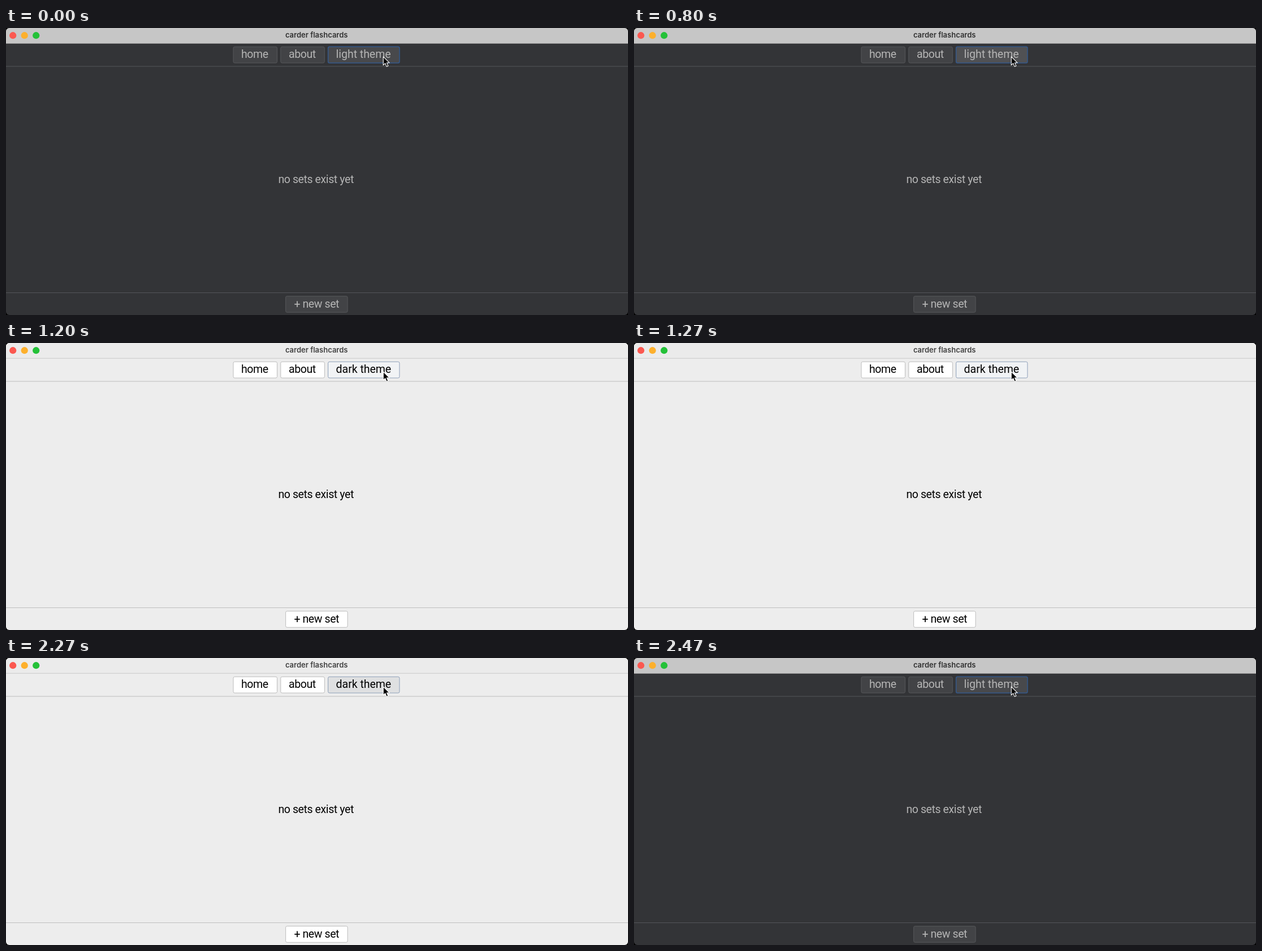
Write an HTML page that moves like this. It is 1100 px wide and 509 px high and loops after 2540 ms.

```html
<!DOCTYPE html>
<html lang="en">
<head>
<meta charset="utf-8">
<title>carder flashcards</title>
<style>
  html, body { margin: 0; width: 100%; height: 100%; overflow: hidden; background: #000; }
  svg { display: block; }
  .dark {
    --bar: #c6c6c6; --barline: #b9b9b9; --title: #303030; --bg: #333437; --line: #55565a;
    --text: #b5b5b5; --button: #424346; --border: #56575a;
    --focus: #34598c; --hover: #48494c; --press: #505154; --ring: 1.5;
  }
  .light {
    --bar: #ebebeb; --barline: #cacaca; --title: #404040; --bg: #ededed; --line: #bebebe;
    --text: #000; --button: #fff; --border: #bcbcbc;
    --focus: #8d9fb8; --hover: #f1f3f5; --press: #dfe0e1; --ring: 1;
  }
  .bar { fill: var(--bar); }
  .bg { fill: var(--bg); }
  .line { fill: var(--line); }
  .barline { fill: var(--barline); }
  .button { fill: var(--button); stroke: var(--border); }
  .toggle { fill: var(--hover); stroke: var(--focus); stroke-width: var(--ring); }
  .pressed .toggle { fill: var(--press); }
  .title { font: 600 13px Inter, sans-serif; fill: var(--title); text-anchor: middle; }
  .label { font: 19.5px Roboto, sans-serif; letter-spacing: -.4px; fill: var(--text); }
  .wide { letter-spacing: -.03px; }
</style>
</head>
<body>
<svg id="app" class="dark" width="1100" height="509" viewBox="0 0 1100 509">
  <clipPath id="frame"><rect width="1100" height="509" rx="6"/></clipPath>
  <g clip-path="url(#frame)">
    <rect class="bg" width="1100" height="509"/>
    <rect class="bar" width="1100" height="27"/>
    <rect class="barline" y="26.7" width="1100" height="1"/>
    <rect class="line" y="67.5" width="1100" height="1"/>
    <rect class="line" y="469" width="1100" height="1"/>
  </g>
  <circle cx="12.2" cy="13.2" r="6.1" fill="#fb5850"/>
  <circle cx="32.7" cy="13.2" r="6.1" fill="#fdb02d"/>
  <circle cx="53.2" cy="13.2" r="6.1" fill="#24c138"/>
  <text class="title" x="549.2" y="17.4">carder flashcards</text>

  <rect class="button" x="402" y="33.3" width="77.5" height="28.7" rx="2.5"/>
  <rect class="button" x="485.8" y="33.3" width="77.5" height="28.7" rx="2.5"/>
  <rect class="toggle" x="569.6" y="33.3" width="126.3" height="28.7" rx="2.5"/>
  <rect class="button" x="494.6" y="475.6" width="109.5" height="28.7" rx="2.5"/>

  <text class="label" x="416" y="53.3">home</text>
  <text class="label" x="500" y="53.3">about</text>
  <text class="label wide" id="theme" x="583.6" y="53.3">light theme</text>
  <text class="label" x="481.4" y="275.2">no sets exist yet</text>
  <text class="label" x="509.4" y="496">+ new set</text>

  <path d="M667.2 50.8V65.9L670.6 62.7L673.1 68.4L675.8 67.2L673.4 61.7H678Z"
        fill="#000" stroke="#fff" stroke-width="1.1" stroke-linejoin="round"/>
</svg>
<script>
  const LOOP = 2540;
  // start time, theme, toggle held down
  const steps = [
    [0, 'dark', false],
    [800, 'dark', true],
    [1070, 'light', false],
    [2200, 'light', true],
    [2400, 'dark', false]
  ];
  const app = document.getElementById('app');
  const label = document.getElementById('theme');
  const start = performance.now();
  let current;

  function show(step) {
    if (step === current) return;
    current = step;
    const [, theme, pressed] = step;
    app.setAttribute('class', theme + (pressed ? ' pressed' : ''));
    label.textContent = theme === 'dark' ? 'light theme' : 'dark theme';
  }

  function tick() {
    const t = (performance.now() - start) % LOOP;
    show(steps.findLast(([at]) => t >= at));
    requestAnimationFrame(tick);
  }
  tick();
</script>
</body>
</html>
```
